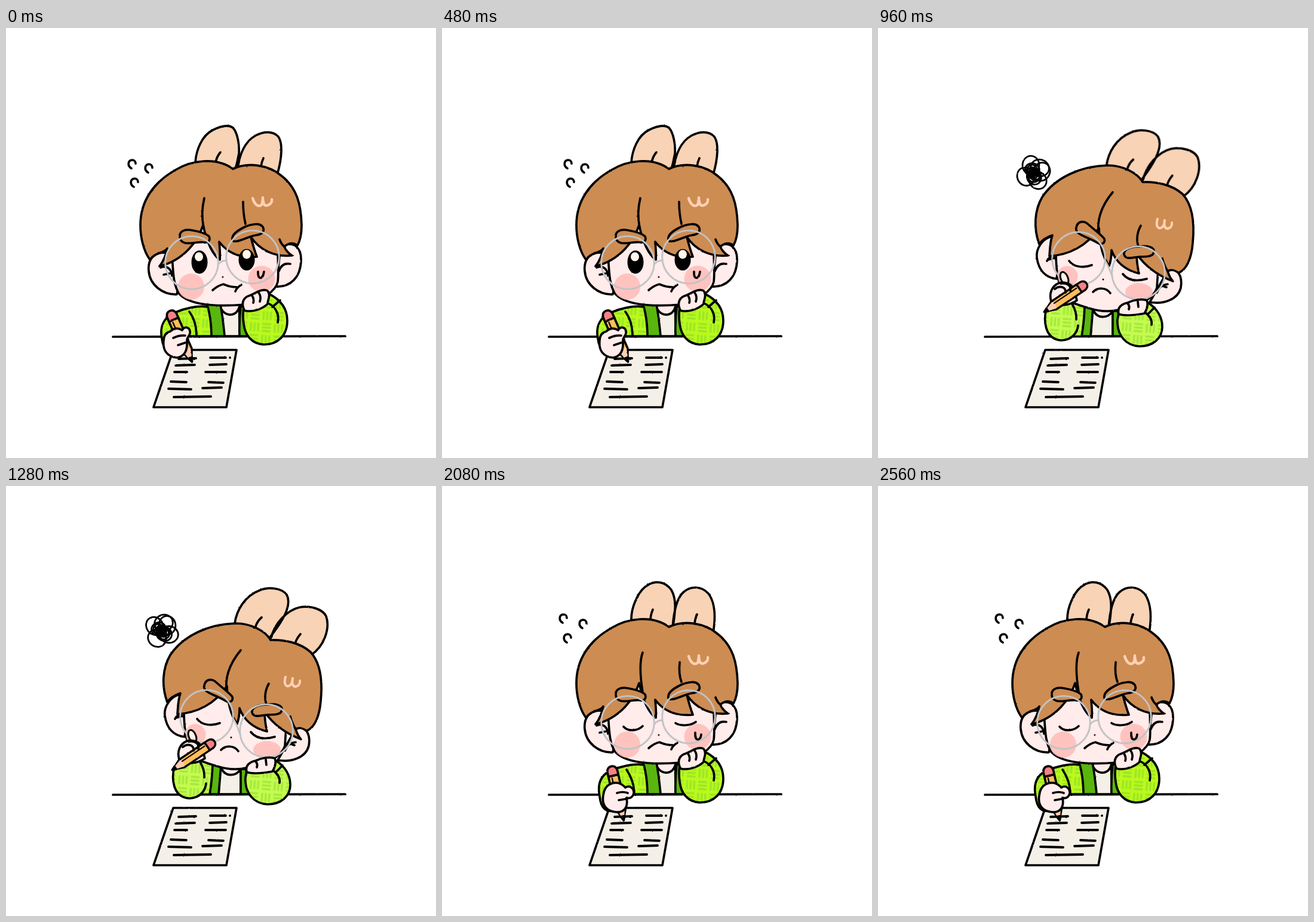
These frames come from a looping animation (720x720 px, 2720 ms). An HTML page:

```html
<!DOCTYPE html>
<html lang="en">
<head>
<meta charset="utf-8">
<title>Homework trouble</title>
<style>
  html, body { margin: 0; width: 100%; height: 100%; overflow: hidden; background: #fff; }
  svg { display: block; width: 100vw; height: 100vh; }
</style>
</head>
<body>
<svg id="stage" viewBox="0 0 720 720"></svg>
<script>
const STEP = 160;
const SEQUENCE = 'ABCABCDEFDEFABCAB';
const HAIR = '#cd8c52', BUNNY = '#f9d3b6', SKIN = '#ffeceb', BLUSH = '#ffb9b4',
      PAPER = '#f4f0e8', DARK_GREEN = '#59b60d', GLASSES = '#c1c3c5';

const path = (d, fill = 'none', stroke = '#000', width = 3.7) =>
  `<path d="${d}" fill="${fill}" stroke="${stroke}" stroke-width="${width}"/>`;
const flat = (d, fill) => path(d, fill, 'none');
const line = (d, width) => path(d, 'none', '#000', width);
const ellipse = (x, y, rx, ry, fill, extra = '') =>
  `<ellipse cx="${x}" cy="${y}" rx="${rx}" ry="${ry}" fill="${fill}" ${extra}/>`;
const group = (content, attrs = '') => `<g ${attrs}>${content}</g>`;

const weave = (id, base, bar) => `<pattern id="${id}" width="40" height="40" patternUnits="userSpaceOnUse" patternTransform="rotate(4)">
  <rect width="40" height="40" fill="${base}"/>
  <path d="M4 4H16M4 10H16M4 16H16M24 24H36M24 30H36M24 36H36M24 4V16M30 4V16M36 4V16M4 24V36M10 24V36M16 24V36"
    stroke="${bar}" stroke-width="3.4" stroke-linecap="round"/></pattern>`;

const defs = `<defs>${weave('weaveWrite', '#bbf91c', '#9be626')}${weave('weaveThink', '#c5fb50', '#a6e93c')}
  <filter id="rough" x="0" y="0" width="720" height="720" filterUnits="userSpaceOnUse" color-interpolation-filters="sRGB">
    <feTurbulence type="fractalNoise" baseFrequency=".35" numOctaves="1" seed="4"/>
    <feDisplacementMap in="SourceGraphic" scale="2" xChannelSelector="R" yChannelSelector="G"/>
  </filter></defs>`;

// Pencil pointing down, with its tip at (x, y) before rotation.
const pencil = (x, y, angle, size = 1) => group(
  path('M-8.5-76V-20L0 0L8.5-20V-76Z', '#ffbd5c') +
  flat('M-7-21L-2-4H2L7-21Q0-26-7-21Z', '#ffcdb2') +
  line('M-3-72V-23', 2.4) +
  path('M-8.5-76V-84Q-7-92 0-92Q7-92 8.5-84V-76Z', '#f98084') +
  path('M-3-6L0 1L3-6Z', '#000'),
  `transform="translate(${x} ${y}) rotate(${angle}) scale(${size})"`);

const desk = line('M179 517L568 516');
const paper = path('M280 539H386L369 635H247Z', PAPER) +
  line('M289 554L318 553M342 552H368M375 552v.1M284 565L316 564M341 564L369 563M282 576H303M334 576H368' +
       'M276 592L302 593M339 593L364 594M272 604L310 605M329 603L361 602M281 618L343 617', 3.8);

const spectacles = (x1, y1, x2, y2) => {
  const ring = (x, y) => `<circle cx="${x}" cy="${y}" r="44.3" fill="none" stroke="${GLASSES}" stroke-width="2.8"/>`;
  return ring(x1, y1) + ring(x2, y2) +
    path(`M${x1 + 44} ${y1 + 3}Q${(x1 + x2) / 2} ${(y1 + y2) / 2} ${x2 - 44} ${y2 + 6}`, 'none', GLASSES, 2.8);
};

const face = (id, d, blushes) =>
  `<clipPath id="${id}"><path d="${d}"/></clipPath>` + path(d, SKIN) +
  group(blushes, `clip-path="url(#${id})" opacity=".8"`);

const writing = {
  A: {
    bunny: 'M317 226C318 205 328 180 346 171C358 165 372 161 380 167C388 176 391 196 390 210C388 222 386 230 383 240' +
           'M388 238C390 212 400 190 418 180C433 172 448 173 456 182C463 192 463 215 454 246',
    bunnyMarks: 'M359 208C354 214 352 218 351 226M431 218Q428 224 427 232',
    strands: 'M332 285C327 305 328 320 331 335M397 291C397 305 398 315 401 328',
    sweat: 'M422 408C421 422 430 422 432 408',
    flies: [[211, 228], [239, 235], [215, 259]],
    arm: 'M307 475C316 487 319 500 319 516', sleeve: 259,
    pencil: [311, 558, -23.5],
    hand: 'M275 508C282 502 289 502 295 506C299 498 309 501 308 511C307 517 302 517 303 526C304 543 296 551 286 552C270 550 262 540 264 523C264 515 268 510 275 508Z',
    fingers: 'M280 519Q290 514 300 515M288 531L300 527'
  },
  B: {
    bunny: 'M317 226C316 205 328 174 346 165C358 158 374 160 384 174C392 188 392 205 386 240' +
           'M386 238C388 210 394 187 404 178C416 167 434 167 446 180C458 196 458 222 454 246',
    bunnyMarks: 'M353 207Q349 216 349 226M427 215Q423 224 423 232',
    strands: 'M336 279C330 295 332 320 336 345M398 295C397 305 397 318 401 328',
    sweat: 'M424 413C423 428 433 428 434 416', drop: 3, closed: true,
    flies: [[203, 222], [236, 231], [210, 255]],
    arm: 'M309 475C317 487 322 500 322 516', sleeve: 262,
    pencil: [304, 559, -13],
    hand: 'M280 500C290 494 300 497 307 505C315 500 322 507 321 515C318 524 312 523 309 522C312 538 305 547 292 546C276 545 267 535 270 518C271 508 275 503 280 500Z',
    fingers: 'M293 514Q303 511 311 514M296 526L308 524'
  },
  C: {
    bunny: 'M317 226C317 205 319 185 328 172C339 158 360 157 371 165C384 174 384 195 382 240' +
           'M383 238C385 210 386 191 396 182C407 170 428 169 439 177C455 190 455 215 454 246',
    bunnyMarks: 'M349 208L348 224M424 214Q421 224 422 232',
    strands: 'M334 279C329 295 329 315 333 335M398 293C396 305 398 318 402 328',
    sweat: 'M421 425C422 433 433 433 434 424M425 419v1M431 419v1',
    flies: [[196, 213], [230, 223], [203, 249]],
    arm: 'M309 476C316 480 321 488 322 498', sleeve: 264,
    pencil: [297, 559, -3],
    hand: 'M283 502C290 496 302 496 308 502C316 497 319 505 315 515C314 530 314 545 298 545C282 544 277 533 279 518C279 510 280 505 283 502Z',
    fingers: 'M300 503Q309 500 317 505M297 515L314 514M300 527L312 526'
  }
};

function writePose(name) {
  const p = writing[name], drop = p.drop || 0, s = p.sleeve;
  const jacket = 'url(#weaveWrite)';
  const eyes = p.closed
    ? line('M304 403C312 412 328 410 336 402M391 397C399 402 415 402 425 395')
    : ellipse(324, 392, 13.5, 19.5, '#000') + ellipse(323, 383, 7, 7.5, '#fff8ea') +
      ellipse(403, 388, 13.5, 18, '#000') + ellipse(403, 379, 7, 7.5, '#fff8ea');
  const flies = p.flies.map(([x, y]) =>
    group(line('M-1 7C-8 3-7-6 0-7C4-7 6-4 6-1'), `transform="translate(${x} ${y})"`)).join('');

  return flies + path(p.bunny, BUNNY) + line(p.bunnyMarks) +
    // torso
    flat('M336 462H408L412 516H340Z', SKIN) +
    path('M357 466Q363 490 365 516H392Q390 490 391 466C386 484 368 484 360 470Z', PAPER) +
    path('M336 462H359Q364 490 366 516H342Z', DARK_GREEN) +
    path('M393 466Q390 490 391 516H412L400 466Z', DARK_GREEN) +
    desk + paper +
    // sleeves
    flat(`M338 467C320 464 298 470 284 476C264 484 ${s - 2} 500 ${s + 2} 520C${s + 4} 540 275 546 287 544L305 516H344Z`, jacket) +
    line(`M344 516Q344 490 338 467C320 464 298 470 284 476C264 484 ${s - 2} 500 ${s + 2} 520C${s + 4} 540 275 546 287 544M305 516H344` + p.arm) +
    path('M440 445C460 455 471 470 471 490C471 515 455 530 432 530C412 529 400 515 398 495Q396 482 398 468Z', jacket) +
    line('M441 462C452 468 458 480 455 493M446 467L459 456') +
    // head
    path('M272 377C248 372 237 388 239 407C241 430 262 447 286 446L295 400ZM460 366C482 355 495 368 494 390C493 418 476 434 452 433Z', SKIN) +
    line('M259 401C269 397 277 403 278 415M264 413L274 411M476 395C466 393 460 398 457 407') +
    face('face' + name,
      'M278 380C280 410 280 430 290 445C305 462 345 468 400 463C430 455 452 440 455 425C457 410 455 395 455 365L330 325Z',
      ellipse(310, 433, 22, 22, BLUSH) + ellipse(428, 420, 22.5, 22, BLUSH)) +
    path('M241 388C230 373 225 350 225 330C225 290 247 258 285 237C310 222 352 215 380 236C405 224 440 229 462 248' +
         'C487 268 494 295 495 330C495 345 492 357 488 364C480 358 472 361 466 366C469 373 474 378 479 381' +
         'C450 384 425 372 410 350C413 362 417 375 420 383C400 385 375 382 357 358C358 370 359 380 358 388' +
         'C347 380 337 362 330 330C322 355 300 388 257 399C264 390 268 380 270 369C266 377 250 375 241 388Z', HAIR) +
    line('M458 354Q461 362 466 366' + p.strands) +
    path('M413 285C416 295 422 301 428 296Q430 292 430 284C430 292 432 299 438 297C444 295 446 290 445 287', 'none', '#ffd0b3', 4.4) +
    eyes +
    path('M291 350C290 341 298 337 307 338C320 340 334 343 340 349C343 356 338 360 332 359C322 357 310 362 300 360C293 358 291 354 291 350Z', HAIR) +
    path('M379 352C379 344 390 338 400 333C412 328 425 326 430 333C434 341 428 346 418 347C406 349 395 356 386 357C381 358 378 356 379 352Z', HAIR) +
    line('M363 417v.1', 3) +
    line('M346 439Q355 431 364 429Q375 434 387 434M394 430Q386 435 384 441' + p.sweat) +
    spectacles(311, 393 + drop, 413, 383.5 + drop) +
    // hands
    path('M398 470C393 458 400 450 408 448C418 444 430 435 438 440C444 448 438 455 438 462C430 470 415 475 405 474C400 474 398 472 398 470Z', SKIN) +
    line('M412 448Q416 455 414 460M423 443Q428 450 425 458') +
    pencil(...p.pencil) + path(p.hand, SKIN) + line(p.fingers);
}

// Five wide loops around a dense knot of small ones.
function scribble(turn) {
  const loop = (angle, distance, radius) => ellipse(
    distance * Math.cos(angle), distance * Math.sin(angle), radius, radius * .9, 'none',
    `stroke="#000" stroke-width="2.8" transform="rotate(${angle * 20})"`);
  let loops = '';
  for (let i = 0; i < 5; i++) loops += loop(-.95 + i * 1.257, 14, 15.5);
  for (let i = 0; i < 9; i++) loops += loop(i * 2.4, 1 + i * .7, 5 + i);
  return group(loops + ellipse(1, 1, 5, 5, '#000'), `transform="translate(260 243) rotate(${turn})"`);
}

function thinkPose(name, turn, tilt) {
  const jacket = 'url(#weaveThink)';
  return scribble(turn) +
    group(
      path('M383 230C386 208 400 184 424 175C440 168 462 171 470 182C477 195 472 215 443 252' +
           'M444 254C450 230 470 208 492 203C510 200 530 206 536 218C543 238 533 268 511 283', BUNNY) +
      line('M428 220Q421 226 418 235M493 248Q486 256 484 264'),
      `transform="rotate(${tilt} 450 260)"`) +
    // torso
    flat('M335 462H408L404 516H340Z', SKIN) +
    path('M359 466L356 516H393V474C384 488 366 486 361 473Z', PAPER) +
    path('M343 464L360 468Q358 494 356 516H339Z', DARK_GREEN) +
    path('M393 474V516H406L402 474Z', DARK_GREEN) +
    flat('M325 464H346Q345 494 341 516H322Z', jacket) +
    line('M346 466Q345 494 341 516') +
    desk + paper +
    // sleeves
    flat('M330 464C310 463 285 462 279 478C277 505 288 522 308 523C325 522 334 510 335 498L332 480Z', jacket) +
    line('M282 470C277 488 278 522 308 523C325 522 334 510 335 498M325 462Q333 476 332 488') +
    path('M452 460C468 470 476 485 476 500C476 520 460 533 438 533C415 532 402 515 401 495Q400 485 405 474Z', jacket) +
    line('M447 476Q460 486 458 497M452 479L463 468') +
    // head
    path('M292 349C275 352 264 370 266 385C269 405 280 418 299 420L305 380ZM485 407C503 398 510 418 507 435C502 455 478 463 455 459Z', SKIN) +
    line('M283 390C288 380 297 382 300 392M285 388L293 386M485 429C476 430 470 435 467 443M474 431L483 434') +
    face('face' + name,
      'M298 376C298 420 305 445 325 460C350 468 375 479 402 472C430 470 460 455 467 435L470 390L370 325Z',
      ellipse(317, 416, 17.5, 17.5, BLUSH) + ellipse(437, 442, 23, 15, BLUSH)) +
    path('M270 362C260 335 262 305 275 283C297 250 340 231 385 230C410 230 435 243 443 258C465 257 492 262 510 278' +
         'C528 298 530 330 527 360C525 385 517 405 503 410C497 405 490 404 485 407C487 414 490 420 494 424' +
         'C470 415 448 400 433 378C433 390 435 402 437 411C415 406 398 392 391 372C391 382 390 390 387 398' +
         'C377 385 371 365 370 335C350 365 320 380 287 382C288 370 288 358 292 347C283 350 275 354 270 362Z', HAIR) +
    line('M476 386Q479 398 485 407M393 275C372 300 366 325 370 345M440 331C432 345 433 360 437 367') +
    path('M468 320C465 330 468 336 473 335C478 333 480 328 480 322C478 330 480 336 485 336C490 335 493 330 492 326', 'none', '#ffd0b3', 4) +
    path('M332 334C334 324 343 322 350 327C362 338 375 347 379 353C381 361 374 363 368 360C355 352 340 348 335 343C332 340 331 337 332 334Z', HAIR) +
    path('M412 379C411 370 424 366 437 366C452 364 463 367 462 375C461 383 450 383 438 383C426 384 414 389 412 379Z', HAIR) +
    line('M320 390C328 401 345 402 358 397M410 412C418 422 432 425 450 420M360 442C368 434 382 434 389 444') +
    line('M377 421v.1', 3) +
    spectacles(336, 386, 436, 410) +
    // hands
    path('M403 479C400 468 408 462 418 460C428 455 442 453 450 456C453 462 450 472 446 478C435 480 415 483 403 479Z', SKIN) +
    line('M418 461Q422 466 420 471M435 458L436 467') +
    ellipse(312, 419, 6, 11, '#fff3e6', 'stroke="#000" stroke-width="3" transform="rotate(-22 312 419)"') +
    path('M290 458C286 444 291 432 303 427C314 424 324 429 328 437L333 456C322 464 302 468 290 458Z', SKIN) +
    pencil(279, 475, 56, .92) +
    line('M296 437C305 430 315 434 314 443M306 428C317 426 324 432 322 440');
}

const poses = {
  A: writePose('A'), B: writePose('B'), C: writePose('C'),
  D: thinkPose('D', 35, -1), E: thinkPose('E', 70, -.5), F: thinkPose('F', 0, 0)
};

const stage = document.getElementById('stage');
stage.innerHTML = defs + group(
  Object.keys(poses).map(name => group(poses[name], `id="pose${name}"`)).join(''),
  'filter="url(#rough)" stroke-linecap="round" stroke-linejoin="round"');

const layers = Object.keys(poses).map(name => [name, document.getElementById('pose' + name)]);
let shown;
function draw(now) {
  const current = SEQUENCE[Math.floor(now / STEP) % SEQUENCE.length];
  if (current !== shown) {
    shown = current;
    for (const [name, layer] of layers) layer.style.display = name === current ? '' : 'none';
  }
  requestAnimationFrame(draw);
}
draw(performance.now());
</script>
</body>
</html>
```
